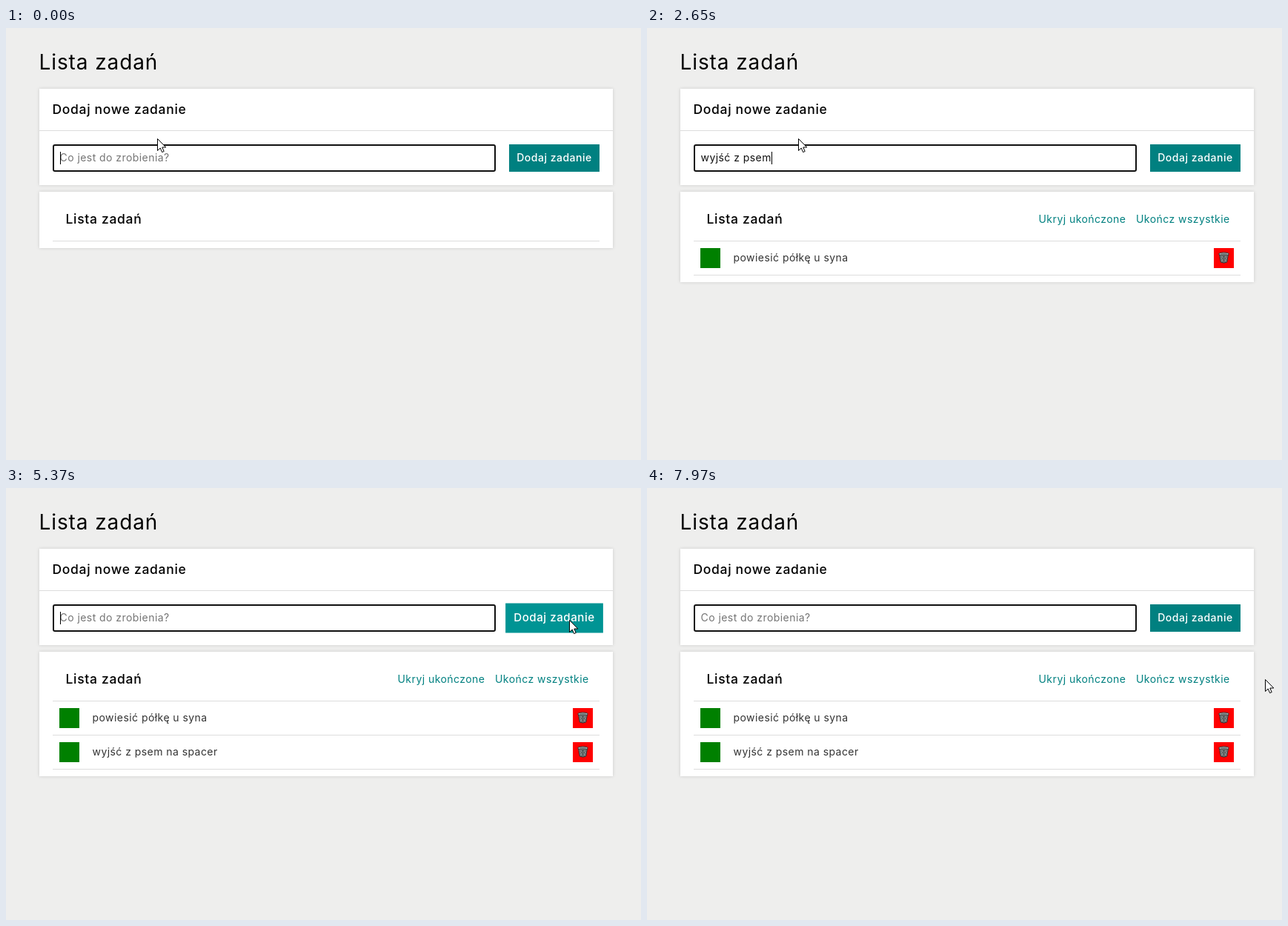
Write an HTML page that moves like this. It is 857x583 px and loops after 8 s.

```html
<!DOCTYPE html>
<html lang="pl">
<head>
<meta charset="utf-8">
<title>Lista zadań</title>
<style>
  html, body { margin: 0; width: 100%; height: 100%; overflow: hidden; background: #eeeeed; }
  svg { display: block; width: 857px; height: 583px; }
  text { font: 400 14px Inter, "Open Sans", sans-serif; letter-spacing: .44px; white-space: pre; }
  .title { font-size: 28px; letter-spacing: .9px; }
  .head { font-size: 17.5px; font-weight: 500; letter-spacing: .68px; }
  .link { fill: #008080; }
  .item { fill: #333; }
  .btn { fill: #fff; font-weight: 500; letter-spacing: .5px; text-anchor: middle; }
  .card { fill: #fff; filter: drop-shadow(0 0 2px rgba(0, 0, 0, .14)); }
  .line { fill: #ddd; }
</style>
</head>
<body>
<svg viewBox="0 0 857 583">
  <defs>
    <g id="bin" stroke-linejoin="round">
      <path d="M1.5 3.5 3.3 14Q7.5 16.2 11.7 14L13.5 3.5Z" fill="#858b8b" stroke="#2d3030"/>
      <path d="M3 6 10 14M6 5 12 12M12 6 5 14M9 5 3.5 11.5M7.5 5V15" fill="none" stroke="#454a4a" stroke-width=".7"/>
      <ellipse cx="7.5" cy="3" rx="6.8" ry="2.1" fill="#b4baba" stroke="#2d3030"/>
      <ellipse cx="7.5" cy="3.1" rx="4.6" ry=".9" fill="#626868"/>
    </g>
    <g id="row">
      <rect x="72" y="297" width="27" height="27" fill="#008000"/>
      <rect x="765" y="297" width="27" height="27" fill="#f00"/>
      <use href="#bin" x="771" y="302"/>
      <rect class="line" x="63" y="333" width="738" height="1"/>
    </g>
  </defs>

  <rect width="857" height="583" fill="#eeeeed"/>
  <text class="title" x="44.5" y="56">Lista zadań</text>

  <rect class="card" x="45" y="82" width="774" height="130"/>
  <rect class="line" x="45" y="138" width="774" height="1"/>
  <text class="head" x="62.5" y="116">Dodaj nowe zadanie</text>
  <rect id="field" fill="#fff"/>
  <text id="entry" x="72.5" y="180"></text>
  <rect id="caret" y="167" width="1" height="17"/>

  <rect id="list" class="card" x="45" y="221" width="774" height="76"/>
  <text class="head" x="80.5" y="264">Lista zadań</text>
  <rect class="line" x="63" y="287" width="738" height="1"/>
  <g id="first">
    <text class="link" x="528.5" y="263">Ukryj ukończone</text>
    <text class="link" x="660" y="263">Ukończ wszystkie</text>
    <use href="#row"/>
    <text class="item" x="116.5" y="315">powiesić półkę u syna</text>
  </g>
  <g id="second">
    <use href="#row" y="46"/>
    <text class="item" x="116.5" y="361">wyjść z psem na spacer</text>
  </g>

  <g id="button">
    <rect id="face" x="-61" y="-18.5" width="122" height="37"/>
    <text class="btn" x="0" y="4.5">Dodaj zadanie</text>
  </g>

  <circle id="click" cx="760" cy="179" r="12" fill="#ffe100" fill-opacity=".62"/>
  <g id="mouse">
    <path id="arrow" d="M.5.5V16.5L4.2 13 6.6 18.6 9.2 17.5 6.8 12H11.8Z" fill="#fff" stroke="#000"/>
    <path id="beam" d="M-3-8H3M0-8V8M-3 8H3" fill="none" stroke="#000"/>
  </g>
</svg>
<script>
const LOOP = 8000, BLINK = 530, TICK = 70;
const ADD1 = 1720, DOWN = 5030, ADD2 = 5170;
const task1 = 'powiesić półkę u syna', task2 = 'wyjść z psem na spacer';
const $ = id => document.getElementById(id);
const set = (id, attrs) => { for (const k in attrs) $(id).setAttribute(k, attrs[k]); };
const show = (id, on) => set(id, { visibility: on ? 'visible' : 'hidden' });

// [time, typed text]
const typing = [[0, '']];
for (let i = 0; i < 7; i++) typing.push([270 + 95 * i, task1.slice(0, 3 * (i + 1))]);
typing.push([ADD1, '']);
for (const [t, n] of [[2320, 4], [2390, 7], [2590, 9], [2650, 12], [3730, 17], [3930, 19], [4010, 22]])
  typing.push([t, task2.slice(0, n)]);
typing.push([ADD2, '']);

// [time, x, y]
const path = [
  [4260, 204, 149], [4330, 301, 174], [4400, 470, 250], [4470, 680, 298], [4540, 750, 192],
  [4610, 758, 181], [4680, 760, 178], [5660, 760, 178], [5800, 748, 200], [5870, 700, 243],
  [6080, 560, 253], [6220, 470, 258], [6500, 427, 260], [6960, 427, 260], [7310, 500, 267],
  [7590, 690, 262], [7830, 823, 256], [7900, 840, 257], [7970, 834, 258]
];

function mouseAt(t) {
  const i = path.findIndex(p => p[0] > t);
  if (i === 0) return path[0].slice(1);
  if (i < 0) return path[path.length - 1].slice(1);
  const [a, b] = [path[i - 1], path[i]], k = (t - a[0]) / (b[0] - a[0]);
  return [1, 2].map(j => Math.round(a[j] + (b[j] - a[j]) * k));
}

const clamp = v => Math.max(0, Math.min(1, v));

function draw(t) {
  const step = Math.floor((t - 60) / TICK) * TICK + 60;
  const focused = t < DOWN || t >= ADD2;

  const [since, typed] = typing.filter(e => e[0] <= t).pop();
  $('entry').textContent = typed || 'Co jest do zrobienia?';
  set('entry', { fill: typed ? '#111' : '#757575' });
  const width = typed ? $('entry').getComputedTextLength() : 0;
  set('caret', { x: Math.round(73 + width) });
  show('caret', focused && Math.floor((t - since) / BLINK) % 2 === 0);

  const w = focused ? 2 : 1;
  set('field', {
    x: 63 + w / 2, y: 157 + w / 2, width: 598 - w, height: 37 - w,
    rx: focused ? 2 : 0, stroke: focused ? '#101010' : '#ddd', 'stroke-width': w
  });

  show('first', t >= ADD1);
  show('second', t >= ADD2);
  set('list', { height: 76 + 46 * ((t >= ADD1) + (t >= ADD2)) });

  const hover = clamp((step - 4520) / 300) * clamp(1 - (step - 5690) / 300);
  set('button', { transform: `translate(740 175.5) scale(${1 + .08 * hover})` });
  const shade = Math.round(128 + 20 * hover);
  set('face', { fill: `rgb(0,${shade},${shade})` });

  const [x, y] = mouseAt(step);
  const inField = x > 63 && x < 661 && y > 157 && y < 194;
  set('mouse', { transform: `translate(${x} ${y})` });
  show('arrow', !inField);
  show('beam', inField);
  show('click', t >= DOWN && t < ADD2);
}

const start = performance.now();
function frame() {
  draw((performance.now() - start) % LOOP);
  requestAnimationFrame(frame);
}
frame();
</script>
</body>
</html>
```
